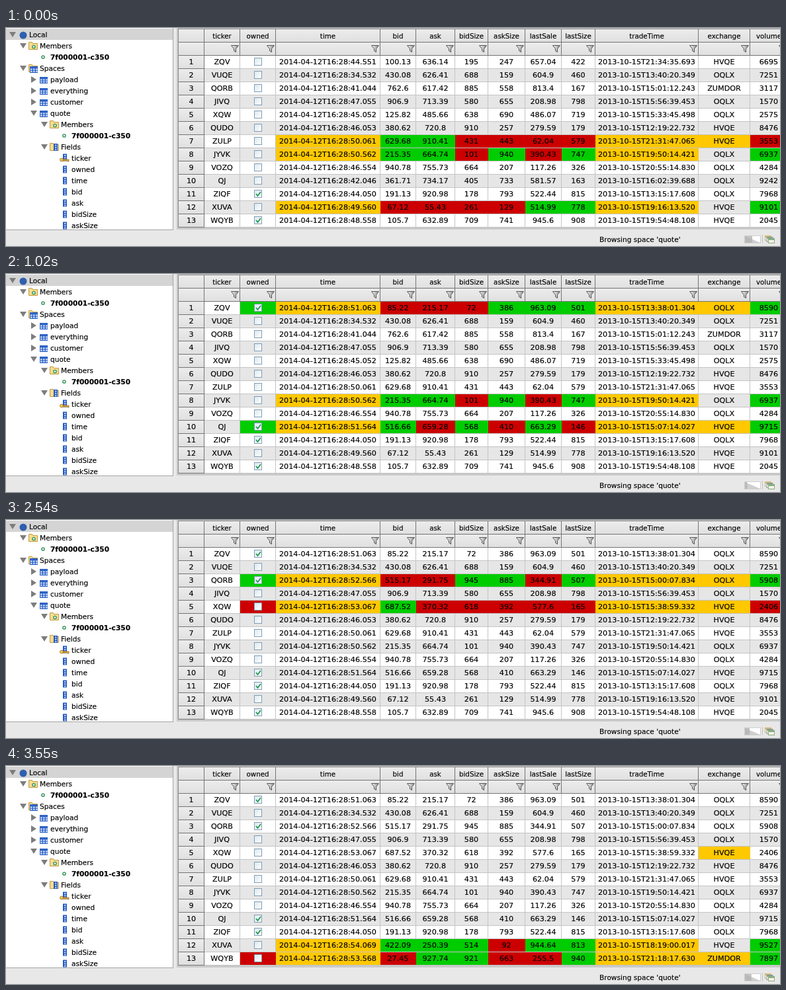
Write an HTML page that moves like this. It is 1170 px wide and 330 px high and loops after 3840 ms.

```html
<!DOCTYPE html>
<html lang="en">
<head>
<meta charset="utf-8">
<title>Browsing space</title>
<style>
  html, body { margin: 0; width: 100%; height: 100%; overflow: hidden; background: #e8e8e8; }
  svg { display: block; width: 1170px; height: 330px; }
  text { font: 10.6px "DejaVu Sans", sans-serif; fill: #000; stroke: #000; stroke-width: .15px; white-space: pre; }
  .bold { font-weight: bold; }
  .head { font-size: 10.3px; text-anchor: middle; }
  .cell { font-size: 11.2px; text-anchor: middle; }
</style>
</head>
<body>
<svg id="stage" viewBox="0 0 1170 330" xmlns="http://www.w3.org/2000/svg">
  <defs>
    <linearGradient id="headFill" x2="0" y2="1">
      <stop offset="0" stop-color="#ececec"/><stop offset="1" stop-color="#e0e0e0"/>
    </linearGradient>
    <linearGradient id="funnelFill">
      <stop offset="0" stop-color="#fff"/><stop offset="1" stop-color="#8c8c8c"/>
    </linearGradient>
    <linearGradient id="boxFill" x2="1" y2="1">
      <stop offset="0" stop-color="#dce8ef"/><stop offset="1" stop-color="#fff"/>
    </linearGradient>
    <clipPath id="treeClip"><rect width="252" height="305"/></clipPath>
  </defs>
</svg>
<script>
const LOOP = 3840;
const STARTS = [0, 510, 1020, 1530, 2040, 2540, 3050, 3550];
const HOLD = 3;        // steps a highlight lasts
const TICK = 0.50095;  // seconds on the feed's clock per step
const COLORS = { G: '#00cc00', R: '#cc0000', Y: '#ffc800' };
const EXCHANGES = { H: 'HVQE', O: 'OQLX', Z: 'ZUMDOR' };
const EDGES = [300, 354, 408, 566, 620, 679, 729, 785, 840, 891, 1047, 1125, 1182];
const HEADS = 'ticker owned time bid ask bidSize askSize lastSale lastSize tradeTime exchange volume'.split(' ');
const KINDS = 'id flag time price price size size price size trade exch volume'.split(' ');
const LIMITS = { price: 1000, size: 1000, volume: 10000 };

// ticker, exchange, steps since its last update
const ROWS = `ZQV H 12, VUQE O 32, QORB Z 19, JIVQ O 7, XQW O 11, QUDO H 9, ZULP O 1,
  JYVK O 0, VOZQ O 8, QJ O 17, ZIQF O 13, XUVA H 2, WQYB H 4`.split(',').map(s => s.trim().split(' '));
const OWNED = ['ZIQF', 'WQYB'];

// One update per step: G up, R down, Y changed, - same; the exchange gives its new letter.
const FIRST = -2;
const UPDATES = `XUVA -YRRRRGGY-G
ZULP -YGGRRRRYHR
JYVK -YGGRGRGY-G
ZQV GYRRRGGGYOG
QJ GYGRGRGRYHG
XQW GYRGGRGRY-G
QORB GYRRGGRGYOG
XQW RYGRRRRRYHR
WQYB RYRGGRRGYZG
XUVA -YGGGRGGY-G`.split('\n').map(s => s.split(' '));

const stage = document.getElementById('stage');

function add(tag, attrs, parent = stage, content) {
  const el = document.createElementNS('http://www.w3.org/2000/svg', tag);
  for (const k in attrs) el.setAttribute(k, attrs[k]);
  if (content !== undefined) el.textContent = content;
  parent.appendChild(el);
  return el;
}
const rect = (x, y, width, height, fill, parent, more) =>
  add('rect', { x, y, width, height, fill, ...more }, parent);
const path = (d, fill, parent, more) => add('path', { d, fill, ...more }, parent);
const label = (x, y, str, cls, parent) => add('text', { x, y, class: cls }, parent, str);

// ---- tree ----
function arrow(x, y, open, g) {
  path(open ? `M${x - 5} ${y - 4}h10l-5 8z` : `M${x - 4} ${y - 5}v10l8 -5z`, '#7d7d7d', g);
}
function folder(x, y, g) {
  path(`M${x} ${y - 5}h5l1 2h7v9h-13z`, '#f6dc8e', g, { stroke: '#c39a45' });
}
function grid(x, y, g) {
  rect(x, y, 12, 10, '#2f63c4', g);
  for (let i = 0; i < 6; i++)
    rect(x + 1 + (i % 3) * 4, y + 3.5 + (i > 2) * 3.2, 2.6, 2, '#dbe8ff', g);
}
function column(x, y, g) {
  rect(x, y - 5.5, 6, 11, '#2458c0', g);
  for (let i = 0; i < 3; i++) rect(x + 2, y - 4 + i * 3.3, 2.5, 2, '#b7d0ff', g);
}
function ring(cx, cy, g) {
  add('circle', { cx, cy, r: 2.1, fill: '#fff', stroke: '#3c9a62', 'stroke-width': 1.5 }, g);
}
const icons = {
  root(x, y, g) { add('circle', { cx: x + 8, cy: y + 1, r: 5.5, fill: '#2f5fae' }, g); },
  members(x, y, g) { folder(x + .5, y - .5, g); ring(x + 8, y + 1.5, g); },
  node(x, y, g) { ring(x + 6, y, g); },
  spaces(x, y, g) { folder(x + .5, y - .5, g); grid(x + 2, y - 3, g); },
  table(x, y, g) { grid(x + 1, y - 4, g); },
  fields(x, y, g) { folder(x + .5, y - .5, g); column(x + 6, y + .5, g); },
  field(x, y, g) { column(x + 4, y, g); },
  key(x, y, g) {
    const edge = { stroke: '#8f6516', 'stroke-width': .7 };
    column(x + 4, y - 1, g);
    path(`M${x + 3} ${y + 2}h10v3h-2v-1h-8z`, '#e9b43a', g, edge);
    add('circle', { cx: x + 2, cy: y + 2.5, r: 2.5, fill: '#f1c453', ...edge }, g);
  }
};

function drawTree() {
  rect(0, 0, 253, 306, '#a5a5a5');
  const g = add('g', { 'clip-path': 'url(#treeClip)' });
  rect(0, 0, 252, 305, '#fff', g);
  rect(0, 1, 252, 17, '#d4d4d4', g);
  // depth, icon, text, arrow (v open, > closed)
  const items = [
    [0, 'root', 'Local', 'v'], [1, 'members', 'Members', 'v'], [2, 'node', '7f000001-c350'],
    [1, 'spaces', 'Spaces', 'v'], [2, 'table', 'payload', '>'], [2, 'table', 'everything', '>'],
    [2, 'table', 'customer', '>'], [2, 'table', 'quote', 'v'], [3, 'members', 'Members', 'v'],
    [4, 'node', '7f000001-c350'], [3, 'fields', 'Fields', 'v'], [4, 'key', 'ticker'],
    ...['owned', 'time', 'bid', 'ask', 'bidSize', 'askSize'].map(s => [4, 'field', s])
  ];
  items.forEach(([depth, icon, str, state], i) => {
    const x = 35 + depth * 16, y = 10 + i * 17;
    if (state) arrow(x - 25, y, state === 'v', g);
    icons[icon](x - 17, y, g);
    label(x, y + 4, str, icon === 'node' ? 'bold' : '', g);
  });
}

// ---- table ----
const width = c => EDGES[c + 1] - EDGES[c];
const mid = c => EDGES[c] + (width(c) - 1) / 2;

function headCell(x, y, w) {
  rect(x, y, w, 20, '#747474');
  rect(x, y, w - 1, 19, 'url(#headFill)');
}
function funnel(x, y) {
  path(`M${x + .5} ${y + .5}h11l-4 5v5l-3 -2v-3z`, 'url(#funnelFill)', stage, { stroke: '#555' });
}

function drawTable() {
  rect(258, 0, 912, 305, '#c9c9c9');
  rect(260, 1, 910, 301, '#8a8a8a');
  rect(261, 2, 909, 300, '#c4c4c4');
  headCell(261, 2, 39);
  headCell(261, 22, 39);
  HEADS.forEach((name, c) => {
    headCell(EDGES[c], 2, width(c));
    headCell(EDGES[c], 22, width(c));
    label(mid(c), 16, name, 'head');
    funnel(EDGES[c + 1] - 14, 26);
  });
  return ROWS.map((_, r) => {
    const y = 42 + r * 20;
    headCell(261, y, 39);
    label(280, y + 13, r + 1, 'cell');
    return KINDS.map((kind, c) => {
      const box = rect(EDGES[c], y, width(c) - 1, 19, '#fff');
      if (kind !== 'flag') return { box, text: label(mid(c), y + 13, '', 'cell') };
      rect(375.5, y + 3.5, 11, 11, 'url(#boxFill)', stage, { stroke: '#7f9db5' });
      const check = path(`M378 ${y + 9}l2.5 3l4.5 -6`, 'none', stage,
        { stroke: '#1f9a55', 'stroke-width': 1.8 });
      return { box, check };
    });
  });
}

// ---- status bar ----
function drawStatus() {
  label(897, 324, "Browsing space 'quote'");
  rect(1116, 314, 25, 12, '#cfcfcf');
  path('M1117 315h23v10z', '#fff');
  const used = rect(1117, 315, 10, 10, '#b4b4b4', stage, { 'fill-opacity': .8 });
  rect(1143, 313, 1, 13, '#c2c2c2');
  ['#d9b777', '#7d9f95', '#8bab82'].forEach((color, i) => {
    const x = 1147 + i * 2.5, y = 314 + i * 2;
    rect(x + .5, y + .5, 9, 7, '#f5f3e6', stage, { stroke: color });
    rect(x + 1, y + 1, 8, 2, color);
  });
  return used;
}

// ---- feed ----
let seed = 20;
function rand() {
  seed = (seed * 16807) % 2147483647;
  return seed / 2147483647;
}
const pad = (n, len) => String(Math.floor(n)).padStart(len, '0');
const clock = step => '2014-04-12T16:28:' + (50.562 + step * TICK).toFixed(3);
const tradeTime = () =>
  `2013-10-15T${pad(12 + rand() * 10, 2)}:${pad(rand() * 60, 2)}:${pad(rand() * 60, 2)}.${pad(rand() * 1000, 3)}`;
const round = (kind, n) => kind === 'price' ? Math.round(n * 100) / 100 : Math.round(n);

function fresh(kind, [ticker, exchange, age]) {
  switch (kind) {
    case 'id': return ticker;
    case 'flag': return OWNED.includes(ticker);
    case 'time': return clock(-age);
    case 'trade': return tradeTime();
    case 'exch': return EXCHANGES[exchange];
    default: return round(kind, (.1 + .85 * rand()) * LIMITS[kind]);
  }
}
function change(kind, v, mark, step) {
  switch (kind) {
    case 'flag': return mark === 'G';
    case 'time': return clock(step);
    case 'trade': return tradeTime();
    case 'exch': return EXCHANGES[mark];
    default: {
      const end = mark === 'G' ? LIMITS[kind] : 0;
      return round(kind, v + (end - v) * (.1 + .8 * rand()));
    }
  }
}

function buildStates() {
  const cells = ROWS.map(row => KINDS.map(kind => ({ v: fresh(kind, row), hue: '', until: 0 })));
  const states = UPDATES.map(([ticker, marks], i) => {
    const step = FIRST + i;
    for (const cell of cells.flat()) if (cell.until <= step) cell.hue = '';
    const row = cells.find(r => r[0].v === ticker);
    [...marks].forEach((mark, m) => {
      if (mark === '-') return;
      const cell = row[m + 1], kind = KINDS[m + 1];
      if (!cell.hue) cell.until = step + HOLD; // a running highlight keeps its end
      cell.hue = kind === 'exch' ? 'Y' : mark;
      cell.v = change(kind, cell.v, mark, step);
    });
    return cells.map(r => r.map(cell => ({ ...cell })));
  });
  return states.slice(-FIRST);
}

drawTree();
const view = drawTable();
const used = drawStatus();
const states = buildStates();
let shown = -1;

function show(step) {
  states[step].forEach((row, r) => row.forEach(({ v, hue }, c) => {
    const { box, text, check } = view[r][c];
    box.setAttribute('fill', COLORS[hue] || (r % 2 ? '#e6e6e6' : '#fff'));
    box.setAttribute('width', width(c) - (hue ? 0 : 1));
    if (text) text.textContent = v;
    else check.setAttribute('visibility', v ? 'visible' : 'hidden');
  }));
  used.setAttribute('width', 2 + (step + 7) % 8 * 1.3);
}

function frame() {
  const t = performance.now() % LOOP;
  const step = STARTS.filter(s => s <= t).length - 1;
  if (step !== shown) show(shown = step);
  requestAnimationFrame(frame);
}
frame();
</script>
</body>
</html>
```
